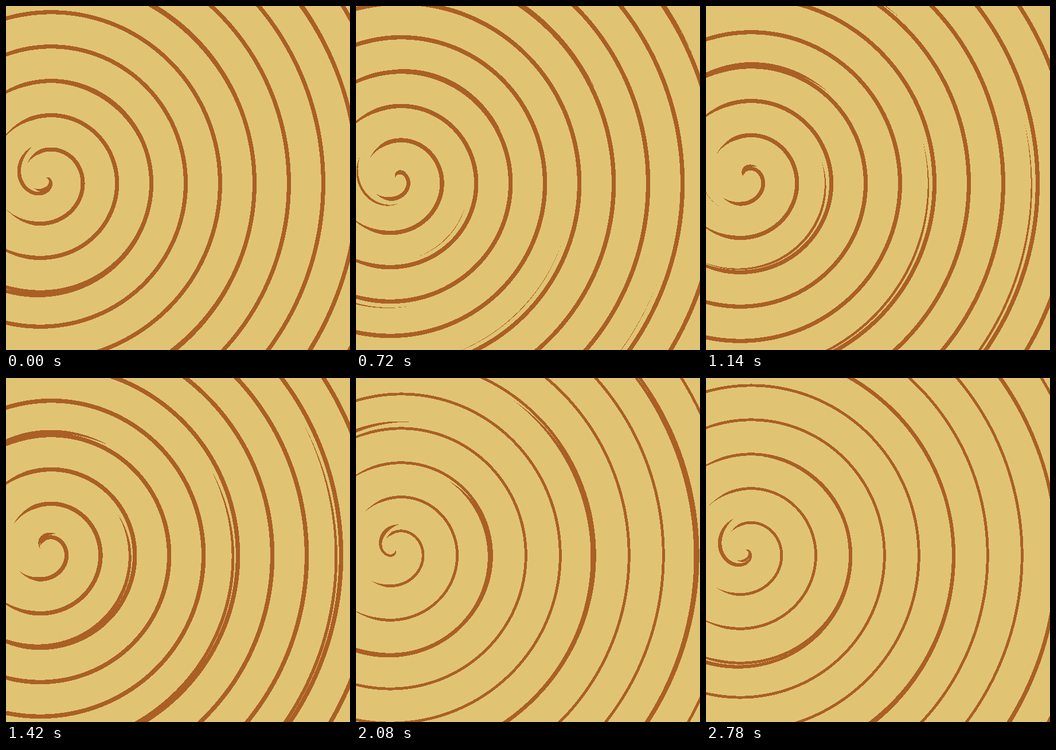
Write an HTML page with a canvas that moves like this. It is 600x600 px and loops after 2.8 s.

```html
<!DOCTYPE html>
<html lang="en">
<head>
<meta charset="utf-8">
<title>Spiral</title>
<style>
  html, body { margin: 0; width: 100%; height: 100%; overflow: hidden; background: #e0c474; }
  canvas { display: block; width: 600px; height: 600px; }
</style>
</head>
<body>
<canvas id="stage" width="600" height="600"></canvas>
<script>
const SIZE = 600, CENTER_X = 69.2, CENTER_Y = 300;
const LOOP = 2800, STEPS = 60;
const PITCH = 60;        // main spiral growth per turn
const SPUR_PITCH = 80;   // crossing strokes grow faster
const BAND = 180;        // crossing strokes repeat in rings
const LINE_WIDTHS = [7.2, 7.5, 5.8, 4.8, 4.9];

const ctx = document.getElementById('stage').getContext('2d');
const image = ctx.createImageData(SIZE, SIZE);
const pixels = new Uint32Array(image.data.buffer);
const rgb = (r, g, b) => (255 << 24 | b << 16 | g << 8 | r) >>> 0;
const SAND = rgb(224, 196, 116), BROWN = rgb(171, 95, 37);
const mod = (a, n) => a - n * Math.floor(a / n);

// Fixed geometry of every pixel
const field = () => new Float32Array(SIZE * SIZE);
const mainPhase = field(), mainLoss = field(), spurPhase = field(), spurHalf = field();

for (let i = 0; i < SIZE * SIZE; i++) {
  const dx = i % SIZE + 0.5 - CENTER_X;
  const dy = Math.floor(i / SIZE) + 0.5 - CENTER_Y;
  const r = Math.hypot(dx, dy), angle = Math.atan2(dy, dx);
  const turn = angle / (2 * Math.PI), cos = Math.cos(angle);

  // The main line tapers away on the left side
  mainPhase[i] = r - PITCH * turn - 0.45;
  mainLoss[i] = Math.max(0, Math.abs(angle) - 1.8) * 11 / 2;

  // Crossing strokes swell and fade inside off-centre rings
  const local = r - BAND * Math.round((r + 29 * cos - 194) / BAND);
  const start = 160 - 29 * Math.cos(angle - 0.38), end = 228 - 29 * cos;
  const t = (local - start) / (end - start);
  spurPhase[i] = local - SPUR_PITCH * turn - 104.8 + SPUR_PITCH / 2;
  spurHalf[i] = 14 * t * (1 - t);
}

function draw(step) {
  const width = LINE_WIDTHS[step % LINE_WIDTHS.length];
  const mainShift = step * PITCH / STEPS, spurShift = step * SPUR_PITCH / STEPS;
  for (let i = 0; i < pixels.length; i++) {
    const u = mod(mainPhase[i] - mainShift, PITCH);
    const onMain = u >= mainLoss[i] && u < width - mainLoss[i];
    const onSpur = spurHalf[i] > 0 &&
      Math.abs(mod(spurPhase[i] - spurShift, SPUR_PITCH) - SPUR_PITCH / 2) < spurHalf[i];
    pixels[i] = onMain || onSpur ? BROWN : SAND;
  }
  ctx.putImageData(image, 0, 0);
}

// Steps come in threes that last 20, 100 and 20 ms
function stepAt(time) {
  const t = time % LOOP, rest = t % 140;
  return 3 * Math.floor(t / 140) + (rest < 20 ? 0 : rest < 120 ? 1 : 2);
}

const begin = performance.now();
let shown = -1;
function tick() {
  const step = stepAt(performance.now() - begin);
  if (step !== shown) draw(shown = step);
  requestAnimationFrame(tick);
}
tick();
</script>
</body>
</html>
```
